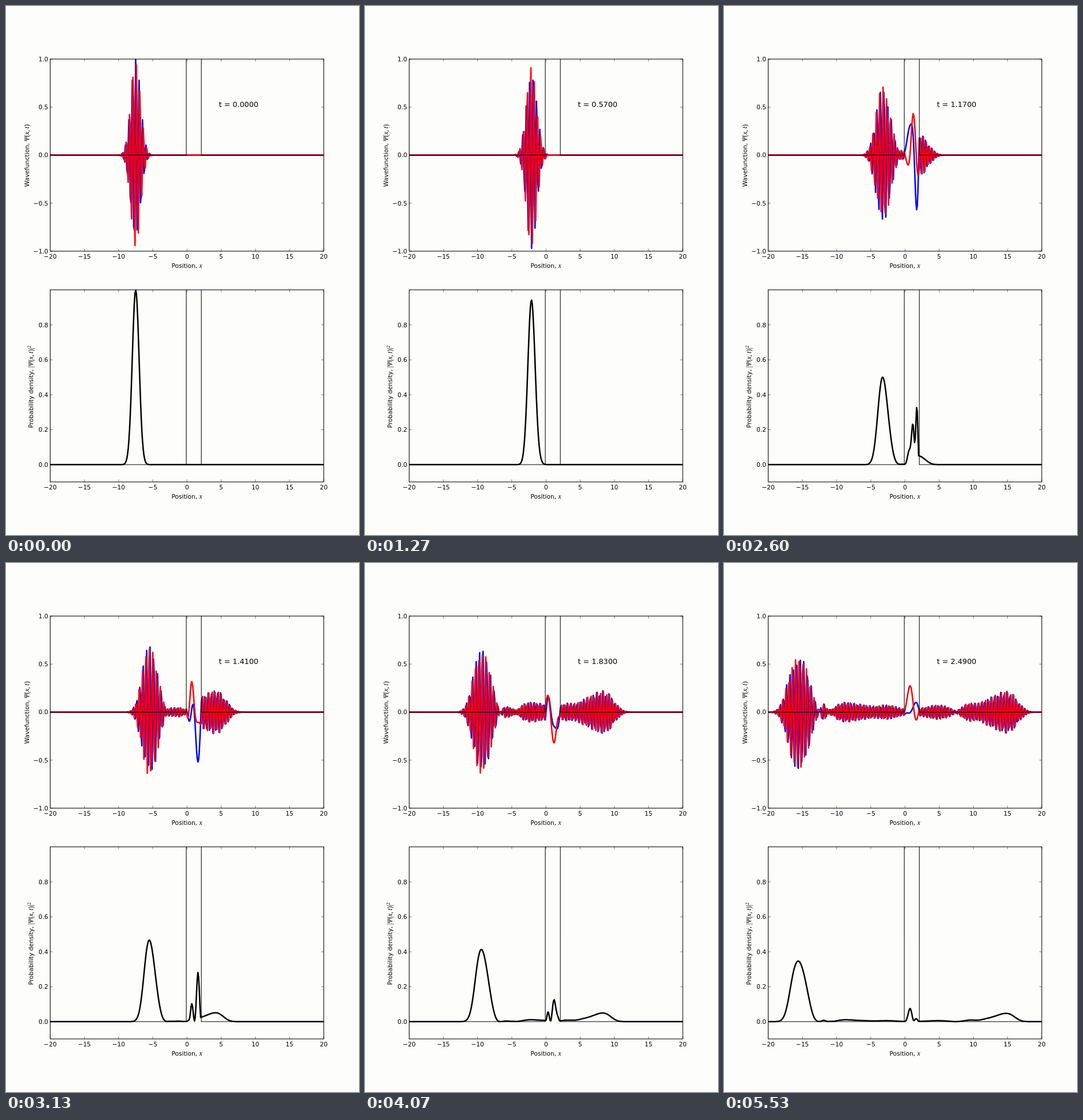
An HTML page that plays this animation: 611 px wide and 917 px high, repeating every 5590 ms.

```html
<!DOCTYPE html>
<html lang="en">
<head>
<meta charset="utf-8">
<title>Wave packet at a barrier</title>
<style>
  html, body { margin: 0; width: 100%; height: 100%; overflow: hidden; background: #fdfdfc; }
  svg { display: block; }
  text { font: 10.6px "DejaVu Sans", sans-serif; fill: #000; }
  .math { font: italic 11.5px "Liberation Serif", serif; }
  .up { font-style: normal; }
  #clock { font-size: 12.73px; }
  path, rect { fill: none; stroke: #000; }
  .frame { stroke-width: 1.06; }
  .tick { stroke-width: .55; }
  .curve { stroke-width: 2.5; stroke-linejoin: round; }
  .barrier { stroke-width: 1.06; }
</style>
</head>
<body>
<svg width="611" height="917" viewBox="0 0 611 917">
  <defs>
    <clipPath id="clipTop"><rect x="76.5" y="92" width="473.5" height="333"/></clipPath>
    <clipPath id="clipLow"><rect x="76.5" y="492" width="473.5" height="333"/></clipPath>
  </defs>
  <g clip-path="url(#clipTop)">
    <path class="curve" id="re" style="stroke:#00f"/>
    <path class="curve" id="im" style="stroke:#f00"/>
    <path class="barrier" id="wallTop"/>
  </g>
  <g clip-path="url(#clipLow)">
    <path class="curve" id="density"/>
    <path class="barrier" id="wallLow"/>
  </g>
  <g id="axes"></g>
  <text id="clock" x="368.6" y="175"></text>
  <g transform="translate(39.5 313.5) rotate(-90)">
    <text>Wavefunction,</text>
    <text class="math" x="78.5">Ψ<tspan class="up">(</tspan>x, t<tspan class="up">)</tspan></text>
  </g>
  <g transform="translate(47 731.5) rotate(-90)">
    <text>Probability density,</text>
    <text class="math" x="104.5"><tspan class="up">|</tspan>Ψ<tspan class="up">(</tspan>x, t<tspan class="up">)|</tspan><tspan class="up" dy="-4" font-size="8" style="font-size:8px">2</tspan></text>
  </g>
</svg>
<script>
const $ = id => document.getElementById(id);
const LOOP = 5590, FRAMES = 84, FRAME_DT = 0.03, SUBSTEPS = 12;
const N = 401, DX = 0.1, V0 = 70, WALL = [200, 220];

const px = x => 76.5 + (x + 20) * 473.5 / 40;
const topY = v => 258.5 - v * 166.5;
const lowY = v => 795 - v * 302.8;
const gridX = i => -20 + i * DX;

// Axes
function drawAxes(top, bottom, toY, ticks) {
  let d = '', labels = '';
  const label = (x, y, s, anchor) =>
    labels += `<text x="${x}" y="${y}" text-anchor="${anchor}">${s.replace('-', '−')}</text>`;
  for (let x = -20; x <= 20; x += 5) {
    const p = px(x);
    d += `M${p} ${top}v4.2M${p} ${bottom}v-4.2`;
    label(p, bottom + 12.9, String(x), 'middle');
  }
  for (const v of ticks) {
    const y = toY(v);
    d += `M76.5 ${y}h4.2M550 ${y}h-4.2`;
    label(73, y + 3.9, v.toFixed(1), 'end');
  }
  labels += `<text x="286.5" y="${bottom + 29}">Position, <tspan class="math">x</tspan></text>`;
  $('axes').innerHTML += `<path class="tick" d="${d}"/>` +
    `<rect class="frame" x="76.5" y="${top}" width="473.5" height="${bottom - top}"/>` + labels;
}
drawAxes(92, 425, topY, [-1, -0.5, 0, 0.5, 1]);
drawAxes(492, 825, lowY, [0, 0.2, 0.4, 0.6, 0.8]);

const wallPath = (y, top) =>
  `M${px(-20)} ${y}H${px(-0.1)}V${top}M${px(2.1)} ${top}V${y}H${px(20)}`;
$('wallTop').setAttribute('d', wallPath(topY(0), 90));
$('wallLow').setAttribute('d', wallPath(lowY(0), 490));

// Schrödinger equation on a grid: i dψ/dt = -ψ''/2 + Vψ
const zeros = () => new Float64Array(N);
const V = zeros().fill(V0, WALL[0], WALL[1] + 1);

function hamiltonian(f, out) {
  for (let i = 1; i < N - 1; i++)
    out[i] = (2 * f[i] - f[i - 1] - f[i + 1]) / (2 * DX * DX) + V[i] * f[i];
}

// Fourth-order Taylor step of exp(-iH dt)
let a = zeros(), b = zeros(), ha = zeros(), hb = zeros();
function step(re, im, dt) {
  a.set(re);
  b.set(im);
  for (let order = 1; order <= 4; order++) {
    hamiltonian(a, ha);
    hamiltonian(b, hb);
    const c = dt / order;
    for (let i = 0; i < N; i++) {
      a[i] = c * hb[i];
      b[i] = -c * ha[i];
      re[i] += a[i];
      im[i] += b[i];
    }
  }
}

const polyline = (f, toY) =>
  'M' + Array.from(f, (v, i) => px(gridX(i)).toFixed(2) + ' ' + toY(v).toFixed(2)).join('L');

function simulate() {
  const re = zeros(), im = zeros(), shots = [];
  for (let i = 0; i < N; i++) {
    const s = gridX(i) + 7.5, env = Math.exp(-s * s);
    re[i] = env * Math.cos(4 * Math.PI * s);
    im[i] = env * Math.sin(4 * Math.PI * s);
  }
  for (let n = 0; n < FRAMES; n++) {
    shots.push({
      re: polyline(re, topY),
      im: polyline(im, topY),
      density: polyline(re.map((v, i) => v * v + im[i] * im[i]), lowY)
    });
    for (let k = 0; k < SUBSTEPS; k++) step(re, im, FRAME_DT / SUBSTEPS);
  }
  return shots;
}

const shots = simulate();
let shown = -1;

function show(n) {
  if (n === shown) return;
  shown = n;
  for (const id of ['re', 'im', 'density']) $(id).setAttribute('d', shots[n][id]);
  $('clock').textContent = 't = ' + (n * FRAME_DT).toFixed(4);
}

// 15 pictures per second, with starts rounded to 10 ms
function tick() {
  const ms = performance.now() % LOOP;
  show(Math.min(FRAMES - 1, Math.floor((Math.floor(ms / 10) + 0.49) * 0.15)));
  requestAnimationFrame(tick);
}
tick();
</script>
</body>
</html>
```
